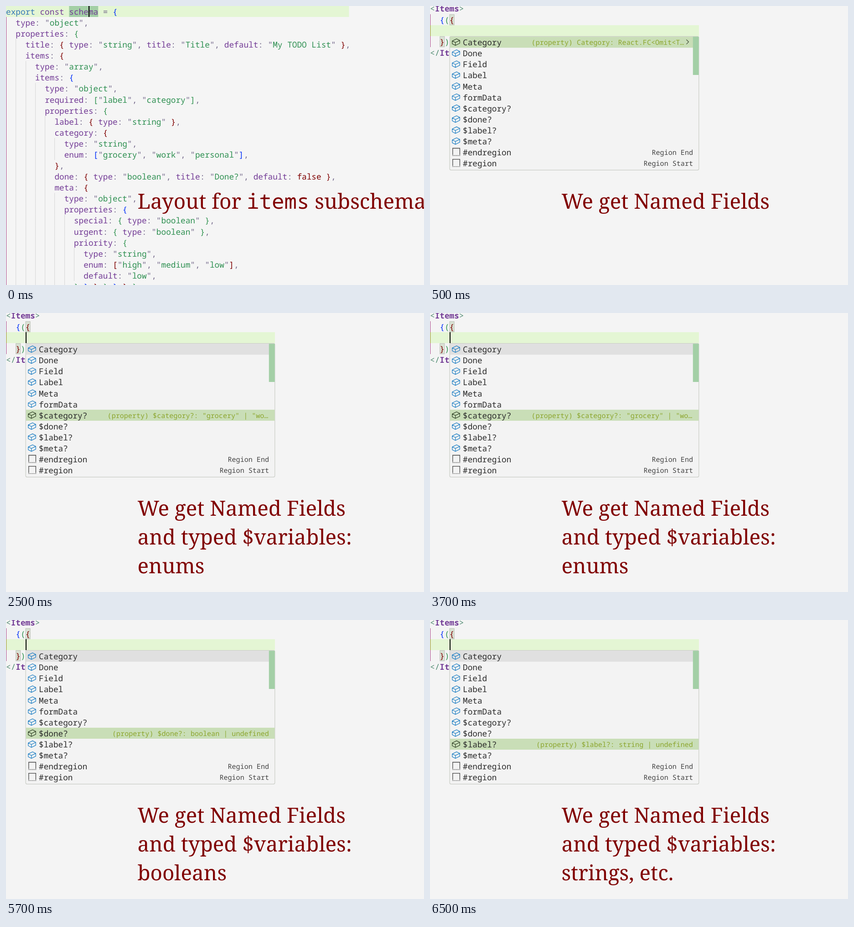
Animation, 917 px wide and 611 px high, one loop 8000 ms. Source, as an HTML page:

```html
<!DOCTYPE html>
<html lang="en">
<head>
<meta charset="utf-8">
<title>Typed form fields</title>
<style>
  html, body { margin: 0; width: 100%; height: 100%; overflow: hidden; background: #f4f4f4; }
  svg { display: block; width: 917px; height: 611px; }
  text {
    white-space: pre; text-rendering: geometricPrecision;
    font: 17.74px "Noto Sans Mono", monospace; fill: #2b2b2b;
  }
  .caption { font: 45.8px "Noto Serif", serif; fill: #800000; }
  .caption tspan { font-family: "Noto Sans Mono", monospace; }
  .detail { font-size: 15.08px; }
</style>
</head>
<body>
<svg id="stage" viewBox="0 0 917 611"></svg>
<script>
const stage = document.getElementById('stage');
const CHAR = 10.644, LINE = 24.08, BASE = 18.9;
const PURPLE = '#733c96', GREEN = '#2f9052', GRAY = '#73688a', RED = '#7f0000';
const BRACKETS = ['#0431fa', '#319350', RED];
const LIT = '#e4f6d4', WORD = '#a3cfa6', PINK = '#b8649c', TAG = '#4f8a70';

const source = `export const schema = {
  type: "object",
  properties: {
    title: { type: "string", title: "Title", default: "My TODO List" },
    items: {
      type: "array",
      items: {
        type: "object",
        required: ["label", "category"],
        properties: {
          label: { type: "string" },
          category: {
            type: "string",
            enum: ["grocery", "work", "personal"],
          },
          done: { type: "boolean", title: "Done?", default: false },
          meta: {
            type: "object",
            properties: {
              special: { type: "boolean" },
              urgent: { type: "boolean" },
              priority: {
                type: "string",
                enum: ["high", "medium", "low"],
                default: "low",
              } } } } } } }`.split('\n');

const esc = s => s.replace(/&/g, '&amp;').replace(/</g, '&lt;');
const rect = (x, y, w, h, fill, more = '') =>
  `<rect x="${x}" y="${y}" width="${w}" height="${h}" fill="${fill}" ${more}/>`;
const span = (s, fill, more = '') => `<tspan fill="${fill}" ${more}>${esc(s)}</tspan>`;
const text = (x, y, inner, more = '') => `<text x="${x}" y="${y}" ${more}>${inner}</text>`;
const path = (d, stroke, width, more = '') =>
  `<path d="${d}" fill="none" stroke="${stroke}" stroke-width="${width}" ${more}/>`;
const caption = lines => lines.map((s, i) => text(288.4, 443.5 + 63 * i, s, 'class="caption"')).join('');

let depth = 0;
function paint(token) {
  if (/^[{[]/.test(token)) return span(token, BRACKETS[depth++ % 3]);
  if (/^[}\]]/.test(token)) return span(token, BRACKETS[--depth % 3]);
  if (token[0] === '"') return span('"', GRAY) + span(token.slice(1, -1), GREEN) + span('"', GRAY);
  if (token === 'export') return span(token, '#3676b8');
  if (token === 'false') return span(token, RED);
  return span(token, /\w/.test(token) ? PURPLE : GRAY);
}

function codeScene() {
  depth = 0;
  const rows = source.map((line, i) =>
    text(0, BASE + i * LINE, line.match(/"[^"]*"|\w+|\s+|./g).map(paint).join('')));
  let guides = rect(0, 24, 1.2, 587, PINK);
  source.forEach((line, i) => {
    for (let col = 2; col < line.search(/\S/); col += 2)
      guides += rect(Math.round(col * CHAR), i * LINE, 1.2, LINE + .1, '#dadada');
  });
  return rect(0, 0, 917, 611, '#f5f5f5') + rect(0, 0, 752.5, 24, LIT) +
    rect(13 * CHAR, 0, 6 * CHAR, 24, WORD) + guides + rows.join('') +
    rect(181, 0, 2.2, 24, '#000') +
    caption(['Layout for <tspan>items</tspan> subschema']);
}

const items = ['Category', 'Done', 'Field', 'Label', 'Meta', 'formData',
  '$category?', '$done?', '$label?', '$meta?', '#endregion', '#region'];
const notes = { '#endregion': 'Region End', '#region': 'Region Start' };

function item(name, i, picked, detail, detailX) {
  const y = 67.3 + i * LINE, on = i === picked;
  let out = on ? rect(44, y, 545.5, LINE, '#c9deb7')
    : i === 0 ? rect(44, y, 533, LINE, '#e0e0e0') : '';
  if (name[0] === '#') {
    out += path(`M49.8 ${y + 18}v-14.6h15.6v14.6`, '#444', 1.3) +
      path(`M49.2 ${y + 19.4}h17`, '#444', 1.3, 'stroke-dasharray="1.3 1.3"');
  } else {
    out += path('M1.5 6.1 9 2.4l5.5 2.7v5L7 13.8 1.5 11zL7 8.7l7.5-3.6M7 8.7v5.1',
      on ? '#34452a' : '#1f7fc4', 1, `transform="translate(46.9 ${y + 1.6}) scale(1.267)"`);
  }
  out += text(72, y + BASE, esc(name));
  if (on) out += text(detailX, y + 18.1, span(detail, '#8ca62e'), 'class="detail"');
  if (notes[name]) out += text(577, y + 18.1, span(notes[name], '#444'), 'class="detail" text-anchor="end"');
  return out;
}

function popupScene({ picked, detail, x, lines }) {
  const row = i => i * LINE + 12.45;
  const box = (col, y) => rect(col * CHAR + .5, y, CHAR - .6, 22.8, '#d9e2d4', 'stroke="#b9bdb5"');
  const tag = (open, name) => span(open, TAG) + span(name, PURPLE, 'font-weight="700"') + span('>', TAG);
  const first = picked === 0;
  return rect(0, 0, 917, 611, '#f4f4f4') +
    rect(0, 42, 590, 24, LIT) +
    rect(0, 18, 1.2, 72, PINK) + rect(0, 42, 1.2, 24, '#b0b450') +
    box(4, 18.7) + box(2, 66.8) +
    text(0, row(0), tag('<', 'Items')) +
    text(2 * CHAR, row(1), span('{', BRACKETS[0]) + span('(', BRACKETS[1]) + span('{', RED)) +
    text(2 * CHAR, row(3), span('}', RED) + span(')', BRACKETS[1])) +
    text(0, row(4), tag('</', 'Items')) +
    (first ? '' : rect(43, 42, 2, 24, '#000')) +
    rect(43.2, 66.6, 546.6, 292.7, '#f3f3f3', 'rx="3" stroke="#c9ccc5" stroke-width="1.2"') +
    items.map((name, i) => item(name, i, picked, detail, x)).join('') +
    (first ? path('M562.4 73.6l5 5-5 5', '#3c4634', 1.2) : '') +
    rect(576.8, 67.3, 12.8, 83.7, WORD) +
    caption(lines);
}

const named = 'We get Named Fields', typed = 'and typed $variables:';
const scenes = [
  [0, codeScene()],
  [500, popupScene({ picked: 0, x: 222.6, lines: [named],
    detail: '(property) Category: React.FC<Omit<T…' })],
  [2500, popupScene({ picked: 6, x: 222.6, lines: [named, typed, 'enums'],
    detail: '(property) $category?: "grocery" | "wo…' })],
  [4500, popupScene({ picked: 7, x: 233, lines: [named, typed, 'booleans'],
    detail: '(property) $done?: boolean | undefined' })],
  [6500, popupScene({ picked: 8, x: 233, lines: [named, typed, 'strings, etc.'],
    detail: '(property) $label?: string | undefined' })],
];

let shown, start;
function tick(now) {
  start ??= now;
  const t = (now - start) % 8000;
  const scene = scenes.findLast(([from]) => t >= from);
  if (scene !== shown) stage.innerHTML = (shown = scene)[1];
  requestAnimationFrame(tick);
}
requestAnimationFrame(tick);
</script>
</body>
</html>
```
